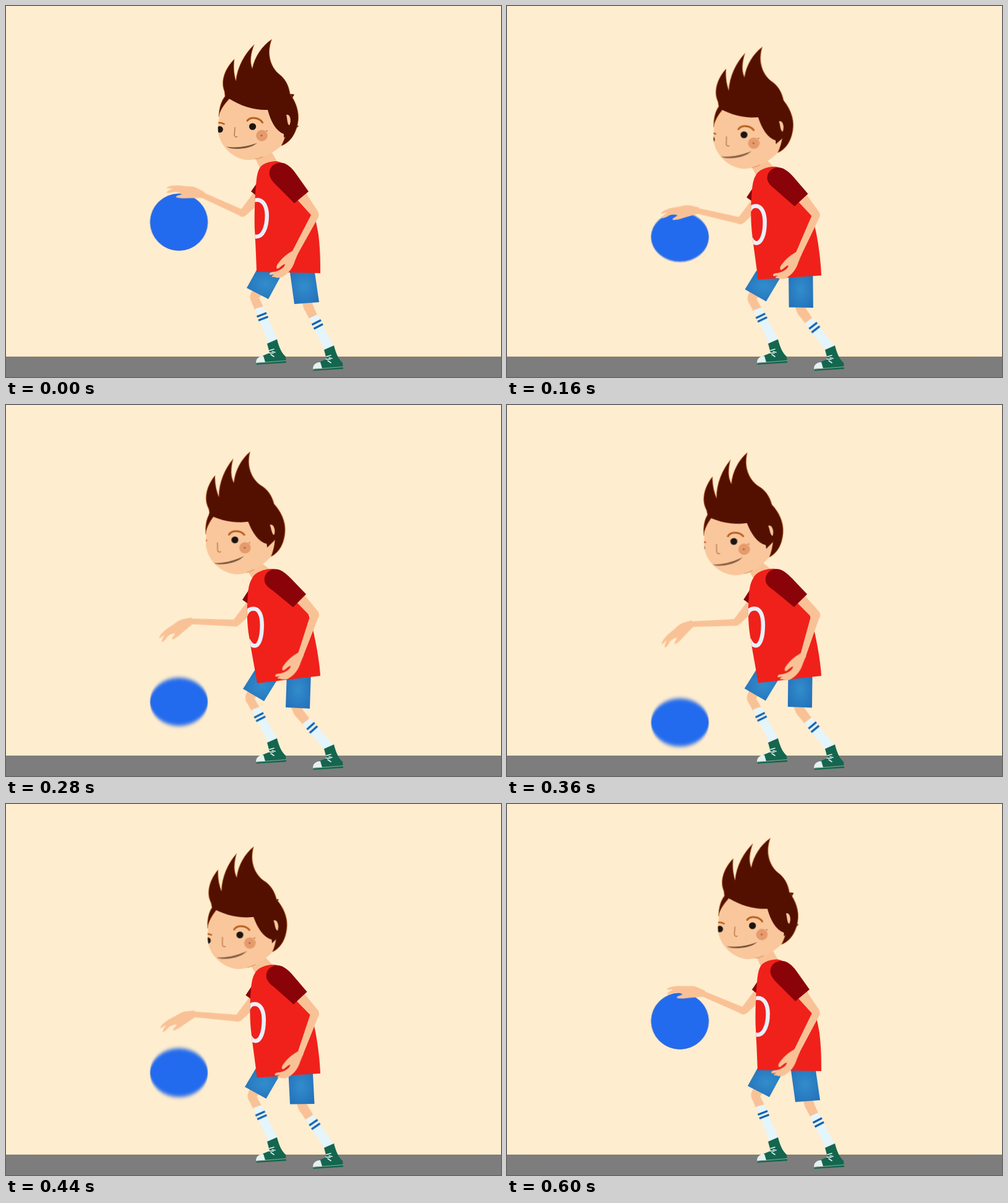
An HTML page without scripts that plays this animation: 800 by 600 pixels, repeating every 640 ms.

```html
<!DOCTYPE html>
<html lang="en">
<head>
<meta charset="utf-8">
<title>Dribble</title>
<style>
html, body { margin: 0; width: 100%; height: 100%; overflow: hidden; background: #feedcf; }
svg { display: block; width: 800px; height: 600px; }

/* Progress curves, held for 1/16 of the loop each: 0 = upright, 1 = crouched */
:root {
  --body: linear(0 0% 6.25%, .06 6.25% 12.5%, .2 12.5% 18.75%, .4 18.75% 25%, .63 25% 31.25%, .83 31.25% 37.5%, .97 37.5% 43.75%, 1 43.75% 50%, 1 50% 56.25%, .98 56.25% 62.5%, .83 62.5% 68.75%, .62 68.75% 75%, .4 75% 81.25%, .2 81.25% 87.5%, .07 87.5% 93.75%, .01 93.75% 100%);
  --legs: linear(0 0% 6.25%, .1 6.25% 12.5%, .28 12.5% 18.75%, .52 18.75% 25%, .74 25% 31.25%, .9 31.25% 37.5%, 1 37.5% 43.75%, 1 43.75% 50%, .95 50% 56.25%, .87 56.25% 62.5%, .71 62.5% 68.75%, .5 68.75% 75%, .3 75% 81.25%, .12 81.25% 87.5%, .03 87.5% 93.75%, 0 93.75% 100%);
  --lag: linear(0 0% 6.25%, .04 6.25% 12.5%, .12 12.5% 18.75%, .22 18.75% 25%, .35 25% 31.25%, .49 31.25% 37.5%, .64 37.5% 43.75%, .8 43.75% 50%, .93 50% 56.25%, 1 56.25% 62.5%, .9 62.5% 68.75%, .75 68.75% 75%, .58 75% 81.25%, .41 81.25% 87.5%, .25 87.5% 93.75%, .12 93.75% 100%);
}
.body, .leg, .lag, .pose { animation: .64s -4ms infinite; }
.body { animation-timing-function: var(--body); }
.leg { animation-timing-function: var(--legs); }
.lag { animation-timing-function: var(--lag); }
.pose { animation-timing-function: steps(2); }

.skin { fill: #f9c296; }
.dark { fill: #8a0309; }
.red { fill: #f0211a; }
.jean { fill: url(#jean); }
.hair { fill: #531000; }
.sock { fill: #e5f5fc; }
.band { stroke: #1562ad; stroke-width: 3.2; }
.line { fill: none; stroke-linecap: round; }

/* Torso */
.shirt { animation-name: shirt; }
@keyframes shirt {
  from { d: path("M409 264C412 256 424 251 437 251C455 253 472 277 486 305C495 325 501 345 505 370C508 395 508 415 508 432L405 430C404 400 403 380 402 362C401 330 403 300 404 290C405 278 406 270 409 264Z"); }
  to { d: path("M398 280C402 271 416 265 431 265C450 267 466 288 479 312C488 335 494 352 498 372C503 395 507 420 508 438L406 450C402 425 395 390 393 375C388 345 390 318 391 305C392 293 394 286 398 280Z"); }
}
.number { animation-name: number; }
@keyframes number {
  from { d: path("M400 314.500C402 313.500 403 313.500 405 313.500C415 313 421.700 323 421.700 339C421.700 358 415 373 405 373C404 373 402 373 400 372"); }
  to { d: path("M387 341C389 333 394 329.500 400 329.500C409 329.500 413.700 340 413.700 356C413.700 376 409 389.500 402 389.500C397 389.500 394 386 391 379"); }
}
.sleeve { animation-name: sleeve; }
@keyframes sleeve {
  from { d: path("M426 274C423 258 440 249 453 256C460 260 464 265 467 269L489 300L466 319L436 289C431 284 428 280 426 274Z"); }
  to { d: path("M418 286C415 271 430 262 443 267C450 270 456 276 460 280L485 306L464 327L431 300C425 296 420 292 418 286Z"); }
}
.cuff { animation-name: cuff; }
@keyframes cuff {
  from { d: path("M405 287L396 300L405 307Z"); }
  to { d: path("M393 298L382 315L392 322Z"); }
}
.neck { animation-name: neck; }
@keyframes neck {
  from { d: path("M402 244L427 232L439 253L411 264Z"); }
  to { d: path("M389 266L411 254L429 268L399 282Z"); }
}

/* Legs */
.short1 { animation-name: short1; }
@keyframes short1 {
  from { d: path("M405 427L389 456L424 474L450 426Z"); }
  to { d: path("M402 429L383 459L417 479L446 432Z"); }
}
.short2 { animation-name: short2; }
@keyframes short2 {
  from { d: path("M458 424L498 424L506 479L466 482Z"); }
  to { d: path("M454 430L493 430L491 491L452 489Z"); }
}
.shin1 { transform-origin: 433px 545px; animation-name: shin1; }
@keyframes shin1 { from { transform: none; } to { transform: rotate(-6deg); } }
.shin2 { transform-origin: 527px 552px; animation-name: shin2; }
@keyframes shin2 { from { transform: none; } to { transform: rotate(-14.4deg); } }

/* Near arm */
.arm { animation-name: arm; }
@keyframes arm {
  from { d: path("M466 308L493 338L463 396L471 402L504 343Q507 338 504 332L482 298Z"); }
  to { d: path("M462 313L491 342L474 404L482 409L504 346Q508 341 505 335L476 302Z"); }
}
.hand { animation-name: hand; }
@keyframes hand { from { transform: none; } to { transform: translate(11.5px, 5.5px); } }

/* Far arm */
.reach { animation-name: reach; }
@keyframes reach {
  0%, 100% { transform: translate(383px, 335.5px); }
  12.5% { transform: translate(381.5px, 340px); }
  25% { transform: translate(378px, 347.5px); }
  37.5% { transform: translate(373px, 352.5px); }
  50% { transform: translate(370.5px, 353px); animation-timing-function: steps(1); }
  56.25% { transform: translate(371px, 351.5px); }
  68.75% { transform: translate(376px, 346.5px); }
  81.25% { transform: translate(381px, 340px); }
  93.75% { transform: translate(383px, 335px); animation-timing-function: steps(1); }
}
.fore { animation-name: fore; }
@keyframes fore {
  0%, 100% { transform: rotate(24.4deg); }
  12.5% { transform: rotate(20deg); }
  25% { transform: rotate(13deg); }
  37.5% { transform: rotate(5.5deg); }
  50% { transform: rotate(-1deg); animation-timing-function: steps(1); }
  56.25% { transform: rotate(-2.3deg); }
  68.75% { transform: rotate(5deg); }
  81.25% { transform: rotate(12deg); }
  93.75% { transform: rotate(23deg); animation-timing-function: steps(1); }
}
.palm { transform-origin: -73px 0; animation-name: palm; }
@keyframes palm {
  0%, 100% { transform: rotate(-17deg); }
  12.5% { transform: rotate(-18deg); }
  25% { transform: rotate(-21deg); }
  37.5% { transform: rotate(-32deg); }
  50% { transform: rotate(-36deg); animation-timing-function: steps(1); }
  56.25% { transform: rotate(-35.5deg); }
  68.75% { transform: rotate(-31deg); }
  81.25% { transform: rotate(-21deg); }
  93.75% { transform: rotate(-20deg); animation-timing-function: steps(1); }
}

/* Head */
.head { transform-origin: 407px 160px; animation-name: head; }
@keyframes head {
  0%, 100% { transform: translate(0, 0) rotate(0deg); }
  12.5% { transform: translate(-3.5px, 4px) rotate(-1deg); }
  25% { transform: translate(-11px, 13.5px) rotate(-3.2deg); }
  37.5% { transform: translate(-20px, 21.5px) rotate(-5.5deg); }
  50% { transform: translate(-27px, 25.5px) rotate(-6.9deg); animation-timing-function: steps(1); }
  56.25% { transform: translate(-28.5px, 25px) rotate(-6.8deg); }
  68.75% { transform: translate(-20px, 16.8px) rotate(-5deg); }
  81.25% { transform: translate(-10px, 8px) rotate(-3.2deg); }
  93.75% { transform: translate(-2.3px, 1.7px) rotate(-.9deg); animation-timing-function: steps(1); }
}
/* Features slide over the head as it turns; --k is how far */
.turn { --k: 1px; animation-name: turn; }
.edge { --k: .5px; }
@keyframes turn {
  0%, 100% { transform: translate(0, 0); }
  12.5% { transform: translate(calc(-3 * var(--k)), 0); }
  25% { transform: translate(calc(-6.4 * var(--k)), calc(-1 * var(--k))); }
  37.5% { transform: translate(calc(-9 * var(--k)), calc(-2.5 * var(--k))); }
  50% { transform: translate(calc(-8.5 * var(--k)), calc(-1.5 * var(--k))); animation-timing-function: steps(1); }
  56.25% { transform: translate(calc(-7.5 * var(--k)), calc(-1 * var(--k))); }
  68.75% { transform: translate(calc(-3.5 * var(--k)), calc(-1 * var(--k))); }
  81.25% { transform: translate(calc(-1.4 * var(--k)), calc(-.5 * var(--k))); }
  93.75% { transform: translate(0, 0); animation-timing-function: steps(1); }
}

/* Ball */
.ball { animation-name: ball; }
@keyframes ball {
  0%, 100% { transform: translate(279.5px, 349.5px) scaleY(.99); }
  12.5% { transform: translate(279.5px, 354px) scaleY(.95); }
  25% { transform: translate(279.5px, 373.5px) scaleY(.86); }
  37.5% { transform: translate(279.5px, 423px) scaleY(.83); animation-timing-function: steps(1); }
  43.75% { transform: translate(279.5px, 480px) scaleY(.83); animation-timing-function: steps(1); }
  50% { transform: translate(279.5px, 551px) scaleY(.83); animation-timing-function: steps(1); }
  56.25% { transform: translate(279.5px, 513.5px) scaleY(.83); }
  68.75% { transform: translate(279.5px, 434.5px) scaleY(.84); }
  81.25% { transform: translate(279.5px, 378.7px) scaleY(.9); }
  93.75% { transform: translate(279.5px, 351px) scaleY(.98); animation-timing-function: steps(1); }
}
.blur { animation-name: blur; animation-timing-function: step-end; }
@keyframes blur {
  0%, 93.75%, 100% { filter: none; }
  18.75%, 75% { filter: url(#soft); }
  31.25% { filter: url(#fast); }
}
</style>
</head>
<body>
<svg viewBox="0 0 800 600" xmlns="http://www.w3.org/2000/svg">
  <defs>
    <radialGradient id="jean" r=".65">
      <stop offset="0" stop-color="#328dcc"/>
      <stop offset="1" stop-color="#2370b9"/>
    </radialGradient>
    <filter id="soft" x="-10%" y="-20%" width="120%" height="140%" color-interpolation-filters="sRGB">
      <feGaussianBlur stdDeviation="0 1.2"/>
    </filter>
    <filter id="fast" x="-10%" y="-30%" width="120%" height="160%" color-interpolation-filters="sRGB">
      <feGaussianBlur stdDeviation="0 3"/>
    </filter>
    <path id="face" d="M358 146C346 168 341 188 343 205C347 230 371 249 392 249C412 249 432 238 446 225L456 190L425 145Z"/>
    <clipPath id="mask"><use href="#face"/></clipPath>
    <clipPath id="cloth"><path class="body shirt"/></clipPath>
    <g id="shoe">
      <path fill="#14664f" d="M422 546L438 539C441 551 445 561 452 567L453 577L404 580L414 566L426 561Z"/>
      <path fill="#e5f1f0" d="M404 577C404 570 409 566 416 566L419 576Z"/>
      <path class="line" stroke="#e5f1f0" stroke-width="1.6" d="M426 557L433 555M425 561L432 561.500M428 563.500L433 567M430 559L435 560"/>
      <path stroke="#9aa99b" stroke-width="1" d="M405 577.300L453 573.500"/>
    </g>
  </defs>

  <rect width="800" height="600" fill="#feedcf"/>
  <rect y="567" width="800" height="33" fill="#7d7d7d"/>
  <rect x="36" y="567" width="728" height="1" fill="#8b7a62"/>

  <g class="pose blur">
    <circle class="pose ball" r="46.300" fill="#236bee" stroke="#2d5fc4" stroke-width=".8"/>
  </g>

  <g class="pose reach skin">
    <path d="M-5 -4L19 -36L34 -24L5 3Q0 7 -5 4Z"/>
    <g class="pose fore">
      <path d="M1 -5.500L-74 -4.500L-73 4.500L0 5.500Q5 0 1 -5.500Z"/>
      <path class="pose palm" d="M-69 -5C-79 -8 -85 -12 -93 -11C-105 -10 -113 -11 -120 -9C-125 -8 -130 -6 -131 -3L-121 -4C-125 -1 -130 1 -130 4C-126 5 -121 2 -117 1C-111 0 -107 2 -105 3C-109 6 -114 6 -114 9C-109 11 -99 9 -93 8L-72 5Z"/>
    </g>
  </g>
  <path class="body cuff dark"/>

  <g class="leg shin1">
    <path class="skin" d="M402 456C393 465 393 473 397 479L402 491L416 487L409 472L418 462Z"/>
    <path class="sock" d="M403 489.500L415.500 486L439 541L424 546Z"/>
    <path class="band" d="M405.500 502.500L421 496.500M408 508.500L423.500 502.500"/>
  </g>
  <g class="leg shin2">
    <path class="skin" d="M479 472C479 484 481 490 484 494L490 506L503 500L495 481L496 472Z"/>
    <path class="sock" d="M490 505L503 499L530 551L515 557Z"/>
    <path class="band" d="M494.500 515.500L509 508M497.500 522L512 514.500"/>
  </g>
  <use href="#shoe"/>
  <use href="#shoe" x="92" y="10"/>
  <path class="leg short1 jean"/>
  <path class="leg short2 jean"/>

  <path class="body neck skin"/>
  <path class="body shirt red"/>
  <g clip-path="url(#cloth)">
    <path class="body number" fill="none" stroke="#e9f0fc" stroke-width="6.500"/>
  </g>

  <path class="lag arm skin"/>
  <path class="lag hand skin" d="M463 396C452 402 443 411 438 419C436 424 438 426 441 424C446 420 449 417 451 418C449 424 442 428 433 430C427 430 424 433 427 435L434 434C428 437 429 439 433 438C438 440 443 440 447 438C458 432 464 422 467 412L472 400Z"/>
  <path class="body sleeve dark"/>

  <g class="pose head">
    <path class="pose turn hair" d="M450 139L459 142L466 143L461 152ZM464 190L473 194L464 203Z"/>
    <use href="#face" fill="#f9c79b"/>
    <path class="line" stroke="#d9935f" stroke-width="1.200" d="M403 247.500Q409 247 415 244"/>
    <g clip-path="url(#mask)">
      <g class="pose turn edge">
        <path fill="#7b543c" d="M356 227.500C374 230 391 227 406 221.500C397 229 385 231 372 231C366 231 360 230 356 227.500Z"/>
      </g>
      <g class="pose turn">
        <circle cx="345.500" cy="199.500" r="5.300" fill="#1b1510"/>
        <path class="line" stroke="#b9601f" stroke-width="2.600" d="M340 189.500Q347 187.500 352.500 191"/>
        <circle cx="398.500" cy="195" r="5.600" fill="#1b1510"/>
        <path class="line" stroke="#b9601f" stroke-width="3" d="M390 185.500C395 179 409 179.500 414.500 188.500"/>
        <path class="line" stroke="#b9784c" stroke-width="1.500" d="M370 196.500L369 209Q370.500 213 373.500 211.500"/>
        <circle cx="413.500" cy="209.500" r="9.300" fill="#e59b6c"/>
        <circle cx="413" cy="209.500" r="1.400" fill="#a85f38"/>
        <circle cx="421.500" cy="202" r="1" fill="#a85f38"/>
      </g>
    </g>
    <path class="hair" stroke="#c4681c" stroke-width=".7" d="M344 179C344 166 348 153 354 146L353 138C346 120 355 100 369 86C367 100 369 112 371.500 121C374 98 386 77 401 62.500C395 78 394 91 398 101C402 82 414 64 429.500 54C421 76 427 97 440 109C451 117 457 128 459 142C470 157 474 173 472 187C469 207 459 221 445 226C449 218 452 210 454 200C440 190 430 172 425 154C402 156 380 156 361 150C352 160 346 168 344 179Z"/>
    <path class="pose turn hair" d="M366 140L361 150C380 162 402 169 423 168C428 187 436 202 449 207L449 213L463 202L458 155L430 140Z"/>
    <path class="pose turn edge" fill="#f9c79b" d="M453 176C459 174 462 185 458 193C454 191 455 183 453 176Z"/>
  </g>
</svg>
</body>
</html>
```
